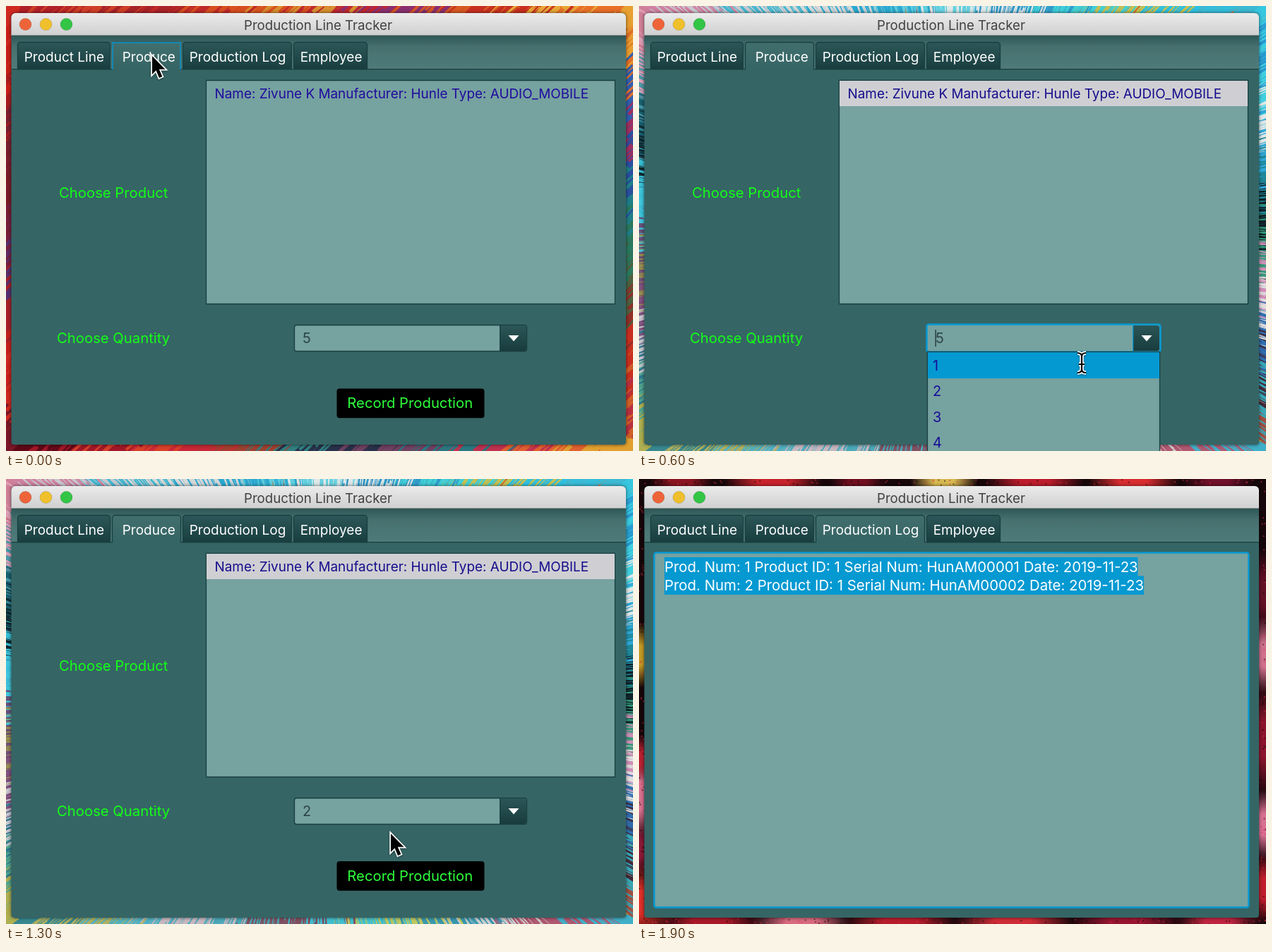
Recreate the animation shown at these times as an HTML page with a canvas. Size 888 by 631 pixels, loop 2 s.

```html
<!DOCTYPE html>
<html lang="en">
<head>
<meta charset="utf-8">
<title>Production Line Tracker</title>
<style>
  html, body { margin: 0; width: 100%; height: 100%; overflow: hidden; }
  canvas { display: block; }
</style>
</head>
<body>
<canvas id="stage" width="888" height="631"></canvas>
<script>
const W = 888, H = 631, LOOP = 2000, STEP = 100;
const ctx = document.getElementById('stage').getContext('2d');
const BLUE = '#0599d2', PANEL = '#76a2a0', BODY = '#366565', EDGE = '#193f40', INK = '#210b9e', LIME = '#14ff18';

const PRODUCT = 'Name: Zivune K Manufacturer: Hunle Type: AUDIO_MOBILE';
const LOG = [1, 2].map(n => `Prod. Num: ${n} Product ID: 1 Serial Num: HunAM0000${n} Date: 2019-11-23`);
const TABS = [
  { label: 'Product Line', x: 16, w: 132, textX: 26 },
  { label: 'Produce', x: 150, w: 98, textX: 165 },
  { label: 'Production Log', x: 250, w: 155, textX: 260 },
  { label: 'Employee', x: 407, w: 105, textX: 417 }
];

// Steps at which the user's actions take effect
const PICK_ROW = 2, OPEN_LIST = 5, HOVER_TWO = 7, CLOSE_LIST = 8, RECORD = 10, OPEN_LOG = 16, FOCUS_LOG = 17;

// Pointer keys: step, x, y
const POINTER = [
  [0, 206, 70], [1, 335, 118], [2, 368, 124], [3, 613, 369], [4, 712, 464], [5, 716, 468], [6, 627, 506],
  [7, 562, 538], [8, 555, 537], [10, 547, 556], [12, 547, 556], [13, 544, 502],
  [14, 440, 300], [15, 328, 80], [16, 317, 60], [17, 719, 185], [18, 360, 160], [19, -9, 137]
];

// ---------- wallpapers ----------
function seeded(seed) {
  return () => {
    seed = (seed * 1664525 + 1013904223) >>> 0;
    return seed / 4294967296;
  };
}

// Calls visit(x, y, u, side) at random points of the four margins.
function aroundMargins(random, spacing, visit) {
  const sides = [
    ['top', W, u => [u * W, 4]], ['right', H, u => [884, u * H]],
    ['bottom', W, u => [u * W, 627]], ['left', H, u => [3, u * H]]
  ];
  for (const [side, length, place] of sides) {
    for (let i = 0; i < length / spacing; i++) {
      const u = random();
      visit(...place(u), u, side);
    }
  }
}

function wallpaper(paint) {
  const layer = document.createElement('canvas');
  layer.width = W;
  layer.height = H;
  paint(layer.getContext('2d'));
  return layer;
}

function streaks(seed, palette, angleAt, width) {
  return wallpaper(g => {
    const random = seeded(seed);
    aroundMargins(random, 0.45, (x, y, u, side) => {
      const colors = palette[side].split(' ');
      const spot = (u + (random() - 0.5) * 0.14) * colors.length;
      const angle = angleAt(x, y) + (random() - 0.5) * 0.2;
      const reach = 6 + random() * 14;
      const dx = Math.cos(angle) * reach, dy = Math.sin(angle) * reach;
      const ox = (random() - 0.5) * 10, oy = (random() - 0.5) * 10;
      g.strokeStyle = '#' + colors[Math.max(0, Math.min(colors.length - 1, Math.floor(spot)))];
      g.lineWidth = width * (0.5 + random());
      g.beginPath();
      g.moveTo(x + ox - dx, y + oy - dy);
      g.lineTo(x + ox + dx, y + oy + dy);
      g.stroke();
    });
  });
}

const warm = streaks(7, {
  top: 'b02028 d04028 a82428 c02a28 d85020 d89030 c02830 8a3070 d85a24 c83020 e8a838 e87028',
  right: 'e8a030 e07028 3060b0 a03060 2a50a0 20808a 2a7a60 506040 903028 c83020 d06028 b83040',
  bottom: '600818 a01828 d8402a c82838 a04030 308080 28304a 704060 2a7880 c03050 e06030 e0a030',
  left: 'd02a20 c82018 a81c20 7a2030 7a1c28 782040 5a3070 a82028 c8201c d02a20 7a1828'
}, () => -0.75, 4);

const cool = streaks(21, {
  top: 'd080a0 c8c8d0 40b8d0 d8d8d8 2aa8d0 60d0e0 e0e8e8 3098c8 40d0d8 c8c050 30c0e0 40b8d0',
  right: '38c8e0 2898d0 40d0e0 e0e8e8 30a8d8 208898 102028 309878 d090b8 e0e0e0 3070b0 402838 38a8b8 a05040',
  bottom: '388890 b0b060 50b0c0 c8b8c0 48a8b8 805060 40c0d0 c0c860 3898b0 d0d0d0 b05870 40b0c8',
  left: 'd08098 e0a0b8 4898a8 186070 102830 38c0d8 40c8e0 685078 989050 805080 c8c8d0 307890 50a890 b0b050'
}, (x, y) => Math.atan2(y - 315, x - 444), 2);

const dark = wallpaper(g => {
  g.fillStyle = '#16060a';
  g.fillRect(0, 0, W, H);
  const blobs = [
    [60, 0, 45, '#8c1522'], [190, 2, 70, '#c8222c'], [310, 4, 40, '#700e20'], [432, 0, 48, '#d8b850'],
    [560, 0, 70, '#bd1c2c'], [700, 4, 65, '#d82c30'], [820, 4, 50, '#70102a'],
    [2, 250, 46, '#c49a24'], [0, 450, 65, '#d87090'], [2, 395, 32, '#b82030'], [2, 525, 38, '#8c1838'],
    [0, 600, 55, '#e03028'], [886, 160, 60, '#621024'], [886, 250, 55, '#d0708c'],
    [886, 370, 80, '#8c142c'], [886, 490, 50, '#d87094'], [886, 580, 50, '#c01c2c'],
    [100, 630, 75, '#a81828'], [230, 630, 70, '#d86a80'], [370, 630, 80, '#b81c2c'],
    [530, 630, 85, '#d02c38'], [690, 630, 80, '#981430'], [820, 630, 60, '#c02440']
  ];
  for (const [x, y, r, color] of blobs) {
    const glow = g.createRadialGradient(x, y, r * 0.3, x, y, r);
    glow.addColorStop(0, color);
    glow.addColorStop(1, color + '00');
    g.fillStyle = glow;
    g.fillRect(x - r, y - r, 2 * r, 2 * r);
  }
  const random = seeded(5);
  aroundMargins(random, 9, (x, y) => {
    g.fillStyle = random() < 0.5 ? '#08040680' : '#e0304080';
    g.fillRect(x + random() * 8 - 4, y + random() * 8 - 4, 2, 2);
  });
});

function drawWallpaper(step) {
  const FADE = 2.4;
  const fadeIn = (layer, start) => {
    ctx.globalAlpha = Math.max(0, Math.min(1, (step - start) / FADE));
    ctx.drawImage(layer, 0, 0);
  };
  fadeIn(warm, -FADE);
  fadeIn(cool, 1.7);
  fadeIn(dark, 14.3);
  ctx.globalAlpha = 1;
}

// ---------- drawing helpers ----------
function text(string, x, baseline, size, color) {
  ctx.font = `${size}px Inter, Roboto, sans-serif`;
  ctx.fillStyle = color;
  ctx.fillText(string, x, baseline);
}

function vertical(y1, y2, ...colors) {
  const gradient = ctx.createLinearGradient(0, y1, 0, y2);
  colors.forEach((color, i) => gradient.addColorStop(i / (colors.length - 1), color));
  return gradient;
}

function box(x, y, w, h, fill, stroke, line = 1, radius = 0) {
  ctx.beginPath();
  ctx.roundRect(x, y, w, h, radius);
  if (fill) {
    ctx.fillStyle = fill;
    ctx.fill();
  }
  if (stroke) {
    ctx.strokeStyle = stroke;
    ctx.lineWidth = line;
    ctx.stroke();
  }
}

function panel(x, y, w, h, focused, radius = 0) {
  if (focused) box(x - 0.5, y - 0.5, w + 1, h + 1, PANEL, BLUE, 2.5, radius);
  else box(x + 0.5, y + 0.5, w - 1, h - 1, PANEL, EDGE, 1.3, radius);
}

// ---------- window ----------
function drawWindow() {
  ctx.save();
  ctx.shadowColor = '#0009';
  ctx.shadowBlur = 5;
  box(7.5, 10, 870.5, 612, BODY, null, 1, [6, 6, 4, 4]);
  ctx.restore();
  box(7.5, 10, 870.5, 32, vertical(10, 42, '#ebebeb', '#cfcfcf'), null, 1, [6, 6, 0, 0]);
  box(8, 42, 870, 47, vertical(42, 89, '#2d5858', '#466f6e', '#4a7775', '#4e7b79'));
  box(8, 41.5, 870, 1.5, '#345452');
  [['#ee6438', 27.5], ['#f0c02c', 56.5], ['#33c546', 85.5]].forEach(([color, x]) =>
    box(x - 8.5, 17.5, 17, 17, color, '#0002', 1, 8.5));
  text('Production Line Tracker', 337, 33.5, 18.65, '#414141');
}

function drawTabs(selected, focused) {
  box(8, 89, 870, 1.3, EDGE);
  TABS.forEach(({ label, x, w, textX }, i) => {
    const active = i === selected;
    box(x + 0.5, 51.5, w - 1, 38, active ? vertical(51, 89, '#426f6e', BODY) : vertical(51, 89, '#2c5758', '#193e40'),
      EDGE, 1.3, [4, 4, 0, 0]);
    if (active) {
      box(x + 1.2, 88, w - 2.4, 4, BODY);
      if (focused) {
        ctx.beginPath();
        ctx.moveTo(x + 1, 90);
        ctx.lineTo(x + 1, 52);
        ctx.lineTo(x + w - 1, 52);
        ctx.lineTo(x + w - 1, 90);
        ctx.strokeStyle = '#1488b4';
        ctx.lineWidth = 2;
        ctx.stroke();
      }
    }
    text(label, textX - 0.3, 78.5, 19, '#fff');
  });
}

function drawProductList(selected, focused) {
  panel(283, 105, 580, 318, focused);
  if (selected) box(284, 106, 578, 36, focused ? BLUE : '#cfcfd3');
  text(PRODUCT, 295.5, 131, 18.9, selected && !focused ? '#160d8c' : INK);
}

function drawCombo(value, focused) {
  panel(408, 452, 330, 38, focused, 3);
  box(700, 453, 37, 36, vertical(453, 489, '#2b5657', '#183c3e'), null, 1, [0, 3, 3, 0]);
  box(699, 453, 1.3, 36, focused ? BLUE : EDGE);
  ctx.beginPath();
  ctx.moveTo(711.5, 467);
  ctx.lineTo(726.5, 467);
  ctx.lineTo(719, 475.5);
  ctx.fillStyle = '#fff';
  ctx.fill();
  text(value, 420, 477.5, 20, '#2b4444');
  if (focused) box(419.5, 459, 1.3, 24, '#1c3030');
}

function drawDropdown(highlight) {
  box(408.5, 490.5, 329, 150, PANEL, EDGE, 1.3);
  box(409, 491 + (highlight - 1) * 36.3, 328, 37, BLUE);
  [1, 2, 3, 4].forEach((n, i) => text(n, 416, 517 + i * 36.3, 20, '#180d98'));
}

function drawProduce(step) {
  const recorded = step >= RECORD;
  text('Choose Product', 75, 271.5, 20.3, LIME);
  text('Choose Quantity', 72, 477.5, 20.3, LIME);
  drawProductList(step >= PICK_ROW, step >= PICK_ROW && step < OPEN_LIST);
  drawCombo(step < CLOSE_LIST ? 5 : 2, step >= OPEN_LIST && !recorded);
  box(468.5, recorded ? 542 : 542.5, 209, 41.7, '#000', null, 1, 4);
  text('Record Production', 483.3, 570, 20.3, '#2eff3c');
  if (step >= OPEN_LIST && step < CLOSE_LIST) drawDropdown(step < HOVER_TWO ? 1 : 2);
}

// The selection is dragged backwards from the end of the log to the pointer.
function drawLog(step) {
  const [pointerX, pointerY] = pointerAt(step);
  const SIZE = 20.4, LEFT = 36, LINE = 26.3;
  panel(22, 105, 841, 502, step >= FOCUS_LOG, 3);
  const pointerRow = step < FOCUS_LOG ? LOG.length : Math.floor((pointerY - 111) / LINE);
  LOG.forEach((line, i) => {
    const y = 132 + i * LINE;
    text(line, LEFT, y, SIZE, INK);
    if (i < pointerRow) return;
    const right = LEFT + ctx.measureText(line).width;
    const left = i > pointerRow ? LEFT : Math.min(right, Math.max(LEFT, pointerX));
    ctx.save();
    ctx.beginPath();
    ctx.rect(left, y - 21, right - left, 27);
    ctx.clip();
    box(left, y - 21, right - left, 27, BLUE);
    text(line, LEFT, y, SIZE, '#fff');
    ctx.restore();
  });
}

// ---------- pointer ----------
function pointerAt(step) {
  const next = POINTER.findIndex(key => key[0] >= step);
  const [t1, x1, y1] = POINTER[next];
  const [t0, x0, y0] = POINTER[Math.max(0, next - 1)];
  const k = t1 === t0 ? 1 : (step - t0) / (t1 - t0);
  return [x0 + (x1 - x0) * k, y0 + (y1 - y0) * k];
}

function drawPointer(step) {
  const beam = step === 6 || step >= FOCUS_LOG;
  const shape = new Path2D(beam
    ? 'M-6 -14Q0 -14 0 -9V9Q0 14 -6 14M6 -14Q0 -14 0 -9V9Q0 14 6 14M-4 2H4'
    : 'M1 1V27L6.5 21.3L11 32L15.4 30L10.8 19.8H19.5Z');
  ctx.save();
  ctx.translate(...pointerAt(step));
  ctx.shadowColor = '#0006';
  ctx.shadowBlur = 3;
  ctx.shadowOffsetY = 1;
  ctx.strokeStyle = '#fff';
  ctx.lineWidth = beam ? 5.5 : 3.4;
  ctx.stroke(shape);
  ctx.shadowColor = 'transparent';
  if (beam) {
    ctx.strokeStyle = '#000';
    ctx.lineWidth = 2.2;
    ctx.stroke(shape);
  } else {
    ctx.fillStyle = '#000';
    ctx.fill(shape);
  }
  ctx.restore();
}

function render(now) {
  const step = Math.floor((now % LOOP) / STEP);
  const logOpen = step >= OPEN_LOG;
  drawWallpaper(step);
  drawWindow();
  drawTabs(logOpen ? 2 : 1, step < PICK_ROW || (logOpen && step < FOCUS_LOG));
  if (logOpen) drawLog(step);
  else drawProduce(step);
  drawPointer(step);
  requestAnimationFrame(render);
}
requestAnimationFrame(render);
</script>
</body>
</html>
```
